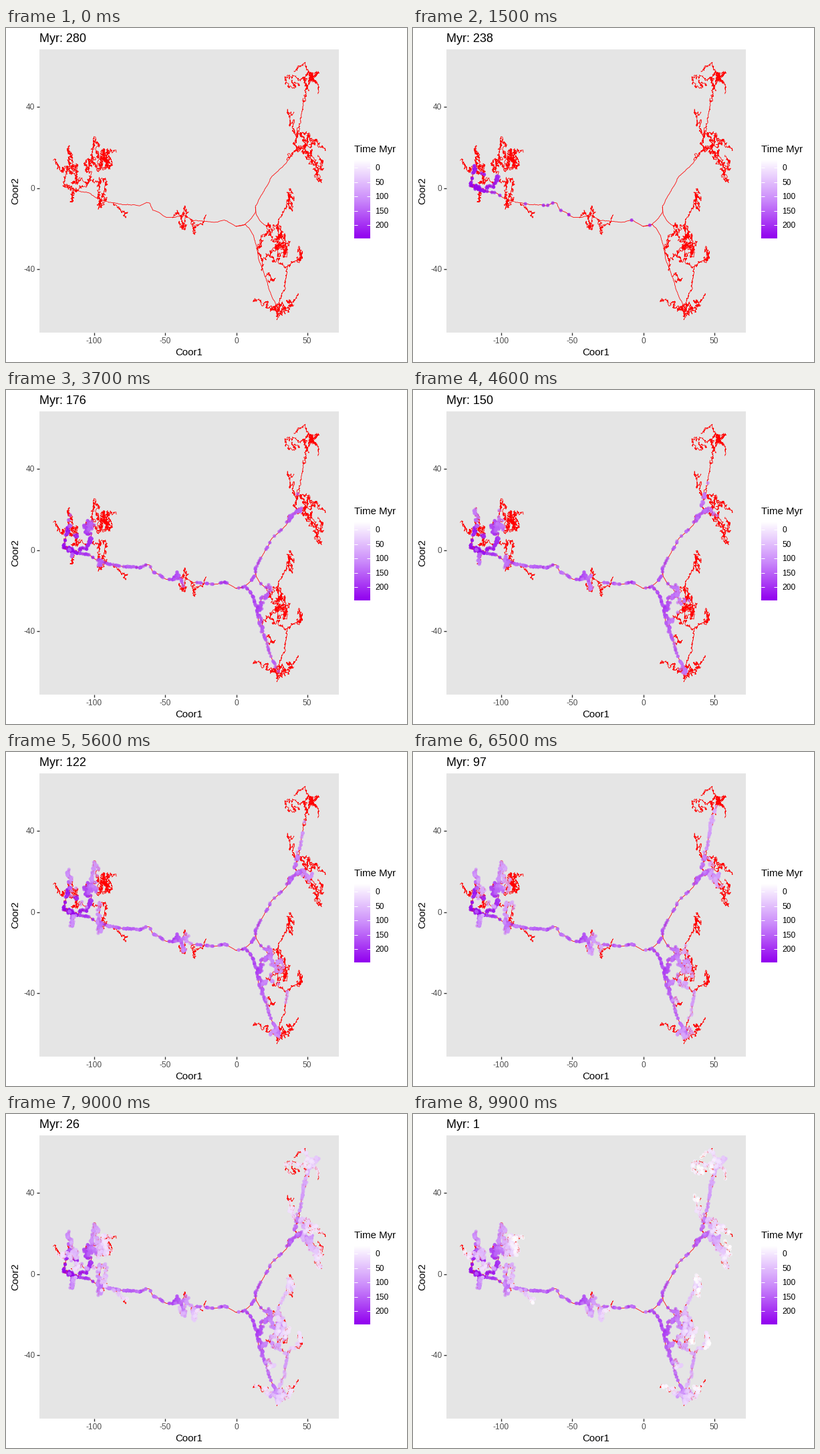
A matplotlib script that plays this animation: 600 by 500 pixels, repeating every 10 s.

```python
import numpy as np
import matplotlib.pyplot as plt
from matplotlib.animation import FuncAnimation
from matplotlib.collections import LineCollection
from matplotlib.patches import Rectangle

plt.rcParams["font.family"] = "Liberation Sans"
W, H, DPI = 600, 500, 100
PT = 72 / DPI
FRAMES, INTERVAL = 100, 100
AGE_START, AGE_END, AGE_MAX = 280.2, 0.6, 275

rng = np.random.default_rng(12)
lines, dots = [], []


def purple(frac):
    stops = [0, 0.5, 1]
    channels = [(255, 204, 146), (255, 141, 0), (255, 251, 239)]
    return np.stack([np.interp(frac, stops, c) for c in channels], -1) / 255


def walk(age0, age1, *pts, amp=1.5, dense=2.2, gap=1.1, spread=9):
    """Noisy walk through pts, dotted with samples aged from age0 to age1."""
    pts = np.array(pts, float)
    dist = np.r_[0, np.cumsum(np.hypot(*np.diff(pts, axis=0).T))]
    n = int(dist[-1] * dense) + 2
    along = np.linspace(0, dist[-1], n)
    path = np.stack([np.interp(along, dist, pts[:, i]) for i in (0, 1)], -1)
    drift = np.zeros(2)
    for p in path[1:]:
        drift = 0.7 * drift + rng.normal(0, 1, 2) * amp * np.array([0.8, 1.2])
        p += drift
    lines.append(path)
    pick = rng.integers(0, n, max(2, int(dist[-1] / gap)))
    age = age0 + (age1 - age0) * pick / n + rng.normal(0, spread, len(pick))
    dots.append(np.column_stack([path[pick], np.clip(age, 1, 278)]))


def stem(age0, age1, *pts, gap=4, spread=15):
    walk(age0, age1, *pts, amp=0.3, dense=0.5, gap=gap, spread=spread)


# left group
walk(278, 242, (98, 240), (86, 235), (88, 224), (92, 212), (96, 204), amp=1, gap=1.6)
walk(276, 240, (86, 236), (98, 238), (106, 244), (112, 238), (121, 236),
     (126, 226), (124, 222), amp=1, gap=1.6)
walk(255, 235, (92, 212), (104, 221), (108, 216), amp=0.8, gap=3)
walk(190, 60, (96, 206), (94, 195), (93, 180), (99, 190), (97, 205), (103, 212), (92, 214))
walk(120, 30, (97, 215), (104, 206), (107, 225), (98, 232), (110, 228))
walk(60, 0, (92, 212), (86, 208), (84, 218), (78, 207), (71, 200), amp=1.2, gap=2)
walk(200, 110, (96, 238), (100, 246), (98, 261), (104, 242), amp=1.1)
walk(235, 190, (126, 226), (120, 214), (118, 200), (125, 198), (123, 212), amp=1.2)
walk(190, 100, (123, 212), (126, 196), (133, 208), (128, 193), (131, 180),
     (133, 166), (138, 172), (136, 186), amp=1.4)
walk(110, 0, (136, 186), (141, 205), (146, 190), (139, 212), (152, 206), (144, 184),
     (156, 208), (155, 192), (150, 182), amp=1.9)
walk(50, 0, (150, 182), (158, 186), (165, 186), amp=0.9, gap=2.5)
walk(215, 130, (137, 253), (140, 262), (143, 256), (139, 269), (145, 262), amp=1.2)
walk(150, 50, (137, 255), (141, 245), (139, 232), (147, 226), (150, 236),
     (144, 250), (150, 258), (142, 265), amp=1.4)
walk(150, 60, (108, 229), (118, 230), (130, 228), (140, 230), amp=0.9, gap=2.5)

# trunk
stem(235, 200, (106, 243), (122, 246), (137, 255), (152, 260), gap=3, spread=20)
stem(188, 188, (152, 260), (175, 264), (200, 266), (211, 261), (215, 262), (219, 272),
     (228, 276), (241, 284), (251, 284), (258, 282), gap=2, spread=35)
stem(190, 190, (258, 282), (268, 281), (280, 288), (300, 290), (312, 291),
     (328, 288), (344, 297), (358, 294), gap=4.5, spread=35)
walk(90, 10, (160, 263), (168, 268), (173, 276), (181, 275), (176, 280), (179, 285),
     amp=0.8, gap=1.7)
walk(215, 150, (250, 284), (257, 275), (262, 284), (264, 298), (266, 290), amp=1)
walk(170, 80, (262, 285), (268, 268), (270, 282), (265, 301), (258, 288), amp=1.1, gap=1.6)
walk(120, 15, (275, 286), (281, 294), (281, 307), (286, 297), (294, 293), amp=1.1)
walk(30, 0, (294, 293), (296, 287), (299, 280), amp=0.5, gap=5)

# upper right group
stem(205, 195, (344, 297), (358, 294), (366, 286), (373, 277), (373, 266), (381, 253),
     (390, 238), (397, 223), (408, 213), (418, 203), (424, 195), (430, 186),
     gap=5, spread=18)
walk(205, 150, (421, 197), (428, 188), (434, 184), (440, 178), (432, 176),
     (436, 160), (438, 152), amp=1.2, gap=1.4)
walk(165, 100, (434, 184), (444, 180), (452, 190), (458, 182), (452, 196), (445, 188))
walk(110, 20, (445, 185), (446, 168), (440, 156), (452, 160), (447, 175),
     (455, 176), (462, 172), (456, 163))
walk(60, 0, (456, 165), (463, 171), (470, 178), (478, 182), amp=1, gap=1.8)
walk(100, 5, (452, 190), (462, 196), (455, 203), (466, 204), (464, 215),
     (470, 227), (462, 220), (472, 210), (468, 192))
walk(60, 0, (432, 160), (428, 150), (430, 140), (424, 145), (426, 135),
     (420, 125), (427, 130), (430, 126), amp=0.8, gap=2)
walk(165, 110, (436, 165), (438, 150), (440, 138), (445, 118), (446, 105),
     amp=0.7, dense=1.2, gap=2.2)
walk(120, 70, (446, 110), (448, 95), (451, 85), (458, 76), (463, 68), amp=1, gap=1.3)
walk(80, 10, (458, 74), (465, 66), (455, 70), (462, 80), (452, 78),
     (458, 68), (448, 72), (445, 80), (452, 90), amp=1.4)
walk(60, 0, (455, 70), (450, 60), (447, 53), (437, 58), (431, 66), amp=0.8, gap=1.8)
walk(50, 0, (450, 76), (438, 76), (427, 73), (417, 74), (422, 86),
     (433, 88), (428, 80), (440, 84), amp=0.9, gap=1.8)
walk(50, 0, (463, 78), (468, 86), (467, 98), amp=0.5, gap=4)

# lower right group
stem(200, 190, (373, 268), (374, 277), (378, 286), (384, 293), (390, 297), gap=6)
stem(215, 165, (358, 294), (363, 300), (370, 309), (374, 325), (378, 345), (385, 364),
     (392, 385), (398, 402), (406, 418), gap=2.3)
walk(222, 185, (374, 330), (380, 326), (378, 334), (384, 348), (385, 362), amp=1, gap=1.7)
walk(200, 135, (380, 328), (384, 312), (392, 306), (390, 294), (398, 300),
     (396, 312), (402, 318), (408, 312), amp=1.3)
walk(150, 50, (402, 318), (412, 312), (406, 325), (415, 330), (408, 340),
     (402, 332), (412, 322), (418, 312), (408, 306), amp=1.9)
walk(100, 5, (398, 300), (405, 296), (412, 305), (405, 330), (416, 326),
     (421, 320), (418, 342), (412, 340), amp=1.8)
walk(165, 110, (384, 348), (395, 338), (401, 350), (408, 346), amp=1.2, gap=1.3)
walk(120, 50, (405, 345), (413, 354), (421, 358), (430, 349), (437, 347), amp=0.9, gap=2)
walk(60, 0, (436, 347), (441, 342), (437, 330), (443, 336), (438, 350), (444, 339), amp=1.1)
walk(105, 65, (406, 300), (409, 285), (414, 275), (420, 268), (421, 258), amp=0.7, gap=2)
walk(80, 0, (421, 258), (426, 262), (422, 250), (430, 258), (424, 246),
     (428, 244), (424, 238), amp=1.2)
walk(40, 0, (421, 258), (424, 268), (429, 272), (427, 262), amp=0.9, gap=1.6)
walk(130, 30, (388, 372), (394, 368), (397, 378), (402, 374), (392, 380), amp=0.9, gap=1.6)
walk(130, 85, (421, 358), (419, 372), (417, 390), (412, 402), (408, 410), amp=0.6, gap=2.2)
walk(180, 130, (404, 414), (409, 422), (402, 418), (408, 412), amp=1.2)
walk(140, 50, (405, 416), (396, 420), (404, 426), (412, 424), (418, 418),
     (410, 412), (404, 433), amp=1.3)
walk(100, 20, (400, 420), (408, 430), (416, 424), (424, 418), (430, 414), amp=1.2)
walk(70, 0, (412, 420), (422, 422), (426, 412), (420, 408), (430, 410), amp=1, gap=1.5)
walk(25, 0, (430, 410), (434, 404), (438, 398), amp=0.7, gap=5)
walk(70, 0, (398, 418), (390, 420), (392, 410), (384, 414), (378, 406), (370, 409),
     amp=1, gap=1.7)

dots = np.concatenate(dots)
dots = dots[np.argsort(-dots[:, 2])]
xy, ages = dots[:, :2], dots[:, 2]
colors = np.column_stack([purple(ages / AGE_MAX), np.full(len(ages), 0.72)])

fig = plt.figure(figsize=(W / DPI, H / DPI), dpi=DPI, facecolor="white")
ax = fig.add_axes([0, 0, 1, 1])
ax.axis("off")


def label(x, y, text, size, color="black", **kw):
    return ax.text(x, y, text, fontsize=size * PT, color=color, va="baseline", **kw)


def rule(xs, ys, color, width=1.4):
    ax.plot(xs, ys, color=color, lw=width * PT, solid_capstyle="butt")


ax.add_patch(Rectangle((50, 32), 448, 424, fc="#e5e5e5", ec="none"))
for v in (-100, -50, 0, 50):
    x = 344.5 + 2.125 * v
    rule([x, x], [456, 460], "#333333")
    label(x, 472, str(v), 12, "#4d4d4d", ha="center")
for v in (-40, 0, 40):
    y = 239.5 - 3.04 * v
    rule([46, 50], [y, y], "#333333")
    label(43.5, y + 4.3, str(v), 12, "#4d4d4d", ha="right")
label(274, 490, "Coor1", 15, ha="center")
label(18.5, 244, "Coor2", 15, ha="center", rotation=90, rotation_mode="anchor")
title = label(50, 21, "", 18)

# colour bar
label(521, 186, "Time Myr", 15)
ax.imshow(purple(np.linspace(0, 1, 118))[:, None], extent=(521, 545, 315, 197),
          aspect="auto", interpolation="nearest")
for v in range(0, 201, 50):
    y = 209 + 0.43 * v
    rule([521, 525.8], [y, y], "white", 1)
    rule([540.2, 545], [y, y], "white", 1)
    label(552.5, y + 4.3, str(v), 12)

ax.add_collection(LineCollection(lines, colors="red", linewidths=0.8 * PT, zorder=3))
points = ax.scatter(xy[:, 0], xy[:, 1], s=(5.2 * PT) ** 2, c=colors,
                    linewidths=0, zorder=4)
ax.set_xlim(0, W)
ax.set_ylim(H, 0)


def update(i):
    now = AGE_START + (AGE_END - AGE_START) * i / (FRAMES - 1)
    shown = np.count_nonzero(ages >= round(now))
    points.set_offsets(xy[:shown])
    points.set_facecolor(colors[:shown])
    title.set_text(f"Myr: {now:.0f}")
    return points, title


anim = FuncAnimation(fig, update, frames=FRAMES, interval=INTERVAL, repeat=True,
                     repeat_delay=0)
plt.show()
```
